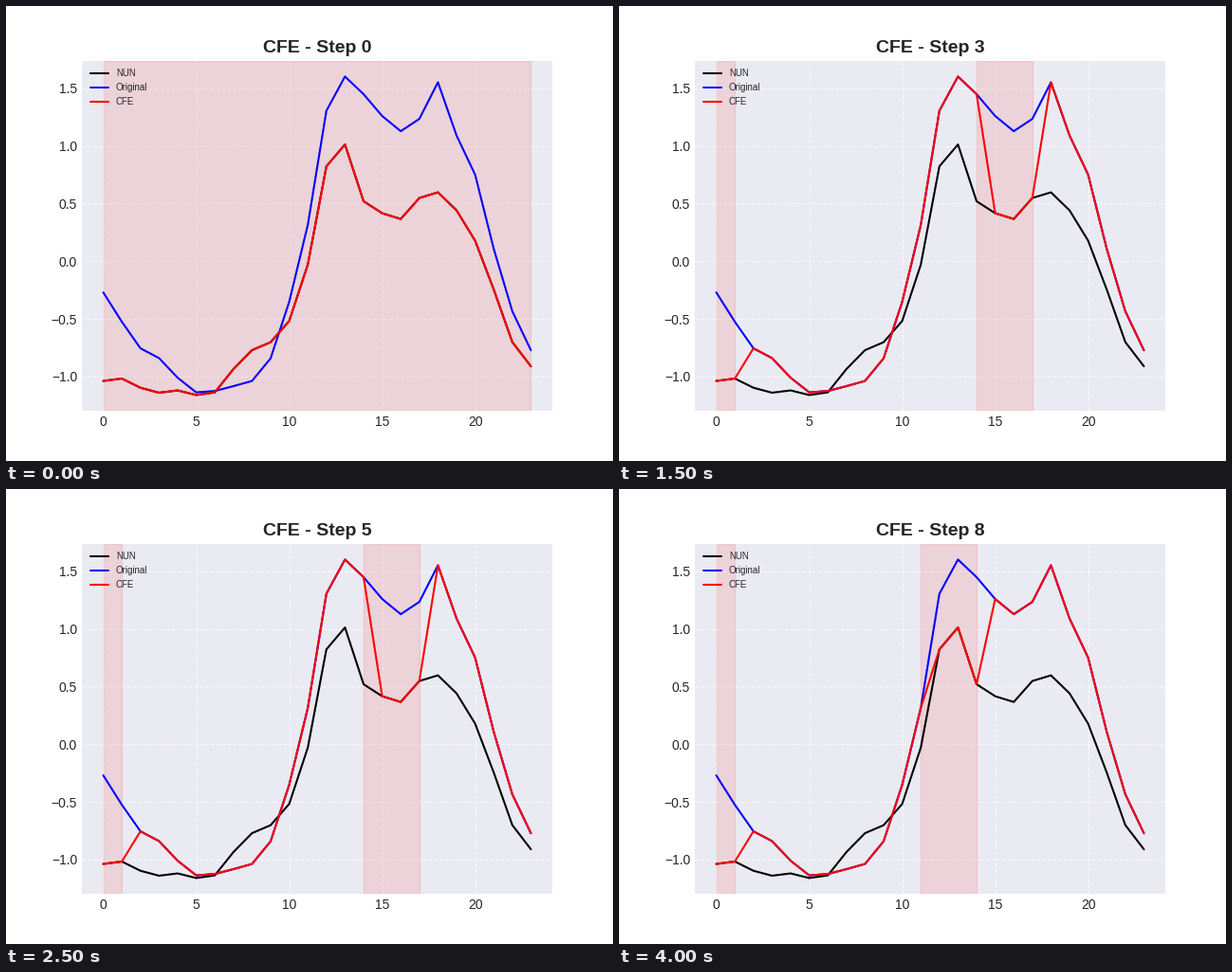
Animation of 640 by 480 pixels, one loop 4.5 s. Source, as a matplotlib script:

```python
import numpy as np
import matplotlib.pyplot as plt
from matplotlib.animation import FuncAnimation

plt.rcParams.update({
    "font.family": "Liberation Sans",
    "text.color": ".15",
    "xtick.color": ".15",
    "ytick.color": ".15",
    "xtick.major.size": 0,
    "ytick.major.size": 0,
    "lines.solid_capstyle": "round",
    "axes.axisbelow": True,
})

STEP_MS = 500

original = np.array([
    -0.270, -0.525, -0.755, -0.840, -1.010, -1.137, -1.125, -1.083,
    -1.038, -0.842, -0.352, 0.314, 1.304, 1.601, 1.448, 1.259,
    1.127, 1.234, 1.551, 1.090, 0.750, 0.108, -0.434, -0.772])
nun = np.array([
    -1.038, -1.017, -1.097, -1.140, -1.120, -1.160, -1.137, -0.935,
    -0.771, -0.702, -0.518, -0.030, 0.822, 1.012, 0.520, 0.416,
    0.366, 0.548, 0.597, 0.441, 0.178, -0.245, -0.701, -0.911])
index = np.arange(len(nun))

# Highlighted intervals of each step
HEAD, PEAK, DIP = (0, 1), (11, 14), (14, 17)
STEPS = [
    [(0, 23)],
    [HEAD, (17, 23)],
    [HEAD, (14, 18)],
    [HEAD, DIP],
    [HEAD, PEAK],
    [HEAD, DIP],
    [HEAD, PEAK],
    [HEAD, DIP],
    [HEAD, PEAK],
]


def counterfactual(spans):
    """Original series with the values inside the spans taken from the NUN."""
    mask = np.zeros(len(index), dtype=bool)
    for start, end in spans:
        first = start + 1 if start else 0
        mask[first:end + 1] = True
    return np.where(mask, nun, original)


fig, ax = plt.subplots(figsize=(6.4, 4.8), dpi=100)
ax.set_facecolor("#EAEAF2")
for spine in ax.spines.values():
    spine.set_visible(False)
ax.grid(True, color="white", linestyle="--", linewidth=0.8, alpha=0.7)

ax.plot(index, nun, color="black", label="NUN")
ax.plot(index, original, color="blue", label="Original")
cfe_line, = ax.plot(index, nun, color="red", label="CFE")
bands = [ax.axvspan(0, 1, color="red", alpha=0.1) for _ in range(2)]

ax.set_xlim(-1.15, 24.15)
ax.set_ylim(-1.298, 1.739)
ax.legend(loc="upper left", fontsize=7, frameon=False)
title = ax.set_title("", fontsize=14, fontweight="bold")


def draw(step):
    spans = STEPS[step]
    title.set_text(f"CFE - Step {step}")
    cfe_line.set_ydata(counterfactual(spans))
    for i, band in enumerate(bands):
        band.set_visible(i < len(spans))
        if i < len(spans):
            start, end = spans[i]
            band.set_x(start)
            band.set_width(end - start)
    return [title, cfe_line, *bands]


anim = FuncAnimation(fig, draw, frames=len(STEPS), interval=STEP_MS,
                     init_func=lambda: draw(0), repeat=True, repeat_delay=0)
plt.show()
```
